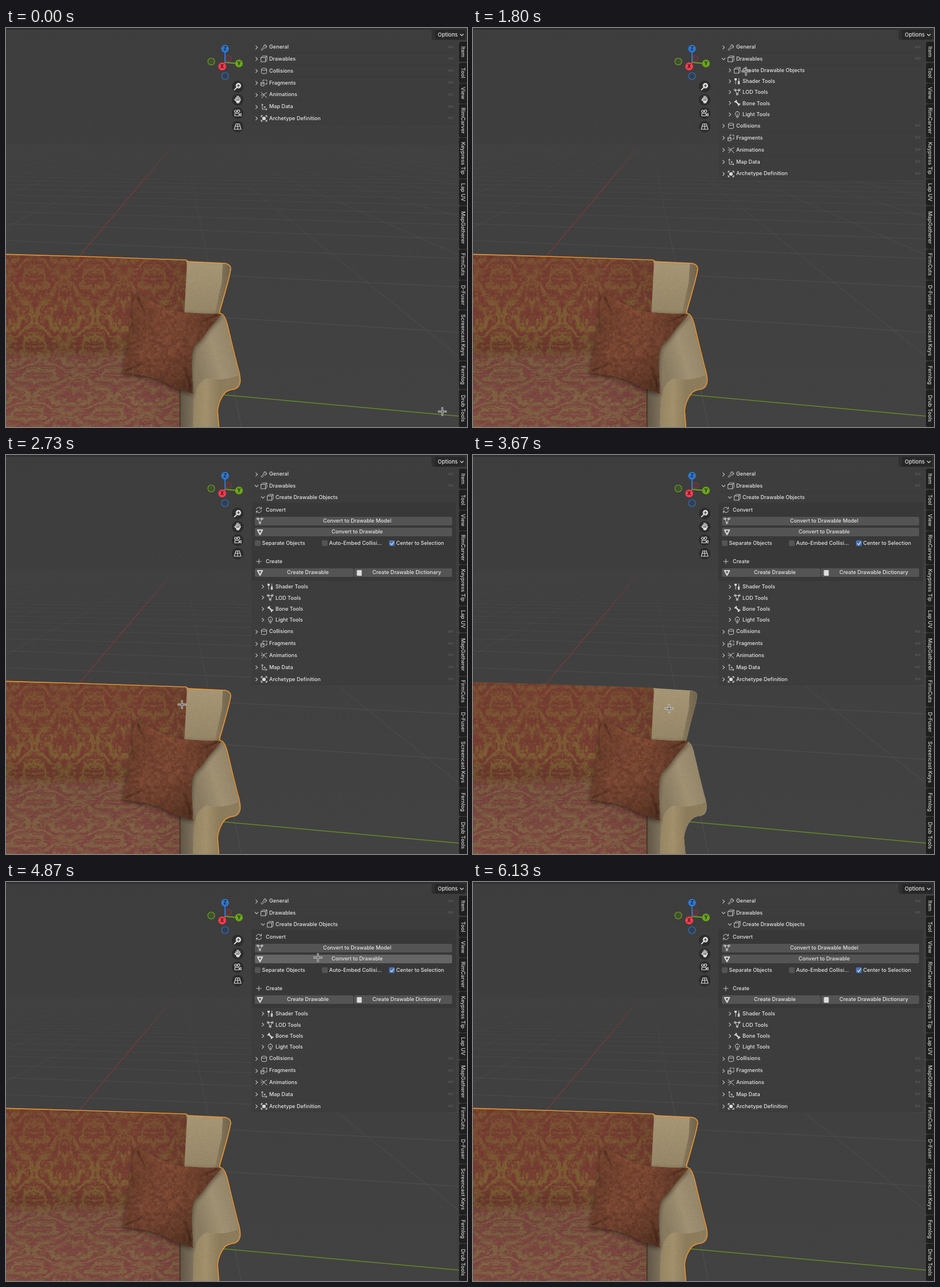
These frames come from a looping animation (804x697 px, 6.54 s). An HTML page with a canvas:

```html
<!DOCTYPE html>
<html lang="en">
<head>
<meta charset="utf-8">
<title>Viewport sidebar</title>
<style>
  html, body { margin: 0; width: 100%; height: 100%; overflow: hidden; background: #404040; }
  body { position: relative; font: 500 9.15px Inter, "Open Sans", sans-serif; color: #e4e4e4; white-space: nowrap; }
  canvas, .over { position: absolute; left: 0; top: 0; width: 804px; height: 697px; }
  .outline { fill: none; stroke: #f0962f; stroke-width: 1.6; stroke-linejoin: round; animation: select 6540ms step-end infinite; }

  .strip { position: absolute; left: 0; top: 0; width: 742px; height: 2.5px; background: #303030; }
  .options { position: absolute; left: 742px; top: 0; width: 62px; height: 21px; background: #303030; border-radius: 0 0 0 5px; }
  .options span { position: absolute; left: 6px; top: 3px; width: 53px; height: 17px; line-height: 17px; text-indent: 5px;
    background: #272727; border-radius: 3px; font-size: 9.4px; }
  .options svg { position: absolute; left: 48px; top: 7px; transform: rotate(90deg); }
  .tab { position: absolute; left: 790px; width: 14px; line-height: 14px; writing-mode: vertical-rl; text-align: center;
    background: #1f1f1f; border-radius: 3px 0 0 3px; color: #d2d2d2; }

  .panels { position: absolute; left: 428px; top: 23.1px; width: 357px; }
  .row { position: relative; height: 20.83px; line-height: 20.83px; background: #3d3d3d; }
  .main { box-shadow: inset 0 -1px #393939; }
  .row > *, .body > * { position: absolute; }
  .row b, .body b { font-weight: inherit; }
  .arrow { left: 4px; top: calc(50% - 5px); }
  .icon { left: 16px; top: calc(50% - 6px); }
  .row b { left: 31px; }
  .dots { left: 343px; top: calc(50% - 3px); width: 9px; height: 4px;
    background: radial-gradient(circle at 1px 1px, #5e5e5e .6px, transparent .9px) 0 0 / 2.4px 2.4px; }
  .sub { overflow: hidden; background: #3d3d3d; animation: sub 6540ms infinite; }
  .sub > div:first-child { margin-top: -.9px; }
  .sub .row { height: 19.3px; line-height: 19.3px; }
  .sub .row > * { margin-left: 11px; }
  .turn1 { animation: turn1 6540ms step-end infinite; }
  .turn2 { animation: turn2 6540ms step-end infinite; }

  .body { position: relative; height: 137.3px; overflow: hidden; background: #383838; animation: body 6540ms infinite; }
  .body b { line-height: 16px; }
  .btn { height: 14.6px; line-height: 14.6px; background: #545454; border-radius: 2.5px; text-align: center; box-sizing: border-box; padding-left: 13px; }
  .btn svg { position: absolute; left: 2.5px; top: 1.3px; }
  .model { animation: model 6540ms step-end infinite; }
  .convert { animation: convert 6540ms step-end infinite; }
  .box { width: 9.5px; height: 9.5px; background: #545454; border-radius: 2px; }
  .on { background: #4772b3; }
  .on svg { position: absolute; left: -.5px; top: -.5px; }
  .cursor { position: absolute; left: -8px; top: -8px; animation: move 6540ms linear infinite; }

  @keyframes select { 0%, 59.17% { opacity: 1 } 53.05% { opacity: 0 } }
  @keyframes sub {
    0%, 17.28% { height: 0; animation-timing-function: ease-out }
    19.42%, 28.29% { height: 96.3px; animation-timing-function: ease-out }
    30.58%, 100% { height: 233.6px }
  }
  @keyframes body {
    0%, 28.29% { height: 0; animation-timing-function: ease-out }
    30.58%, 100% { height: 137.3px }
  }
  @keyframes turn1 { 0% { transform: none } 17.28%, 100% { transform: rotate(90deg) } }
  @keyframes turn2 { 0% { transform: none } 28.29%, 100% { transform: rotate(90deg) } }
  @keyframes model { 0%, 33.7%, 100% { background: #545454 } 33% { background: #656565 } }
  @keyframes convert {
    0%, 34.4%, 79.6%, 100% { background: #545454 }
    33.8%, 65.9%, 74.46% { background: #656565 }
    71.4% { background: #4772b3 }
  }
  @keyframes move {
    0%, 1% { transform: translate(761px, 670px); animation-timing-function: cubic-bezier(.4, 0, .5, 1) }
    10.24% { transform: translate(475px, 93px) }
    12.23% { transform: translate(474px, 68px); animation-timing-function: ease-out }
    15.29%, 20.8% { transform: translate(475px, 56px); animation-timing-function: ease-in-out }
    26% { transform: translate(476px, 75px) }
    30.8% { transform: translate(476px, 77px); animation-timing-function: ease-in-out }
    40.83%, 46% { transform: translate(307px, 436px); animation-timing-function: ease-in-out }
    50.92%, 52% { transform: translate(453px, 430px); animation-timing-function: ease-in-out }
    56.12%, 59% { transform: translate(342px, 443px); animation-timing-function: ease-in-out }
    67.28%, 78.5% { transform: translate(544px, 132px); animation-timing-function: ease-in-out }
    88.69% { transform: translate(159px, 686px) }
    90.67% { transform: translate(125px, 675px) }
    92.66% { transform: translate(80px, 690px) }
    93.73%, 100% { transform: translate(77px, 712px) }
  }
</style>
</head>
<body>
<canvas width="804" height="697"></canvas>

<svg class="over" viewBox="0 0 804 697">
  <path class="outline" d="M-3 395.3L130 399L314 405.3L318 408L382 411Q392 413 392 421Q390 434 382 462Q376 484 373 493L372.5 498L378 500.5Q383 506 386 518L396 560L404 592Q409 608 408.5 618Q407 629 398 631Q388 632 382 637Q371 650 369 668L371.5 700"/>
  <g fill="none" stroke-width="1.2">
    <circle cx="388" cy="53" r="5" stroke="#7c3a40" fill="#54383b"/>
    <circle cx="358" cy="58.5" r="6" stroke="#6ca41a" fill="#42502f"/>
    <circle cx="382" cy="84" r="6" stroke="#3470b8" fill="#303f55"/>
    <path d="M382 60V42" stroke="#2f78d0" stroke-width="2"/>
    <path d="M382 60L401 61.7" stroke="#6ca41a" stroke-width="2"/>
    <path d="M382 60L377 67" stroke="#f33c50" stroke-width="2"/>
  </g>
  <g font-family="Inter, sans-serif" font-size="8.5" font-weight="700" text-anchor="middle">
    <circle cx="382" cy="36.3" r="6.7" fill="#2f78d0"/><text x="382" y="39.4" fill="#10233c">Z</text>
    <circle cx="406.3" cy="62" r="6.7" fill="#6ca41a"/><text x="406.3" y="65.1" fill="#1d2c07">Y</text>
    <circle cx="377" cy="67.2" r="6.9" fill="#f33c50"/><text x="377" y="70.3" fill="#4a0d15">X</text>
  </g>
  <g fill="#2c2c2c">
    <circle cx="404" cy="102.2" r="10.2"/><circle cx="404" cy="125.5" r="10.2"/>
    <circle cx="404" cy="148.8" r="10.2"/><circle cx="404" cy="172.2" r="10.2"/>
  </g>
  <g fill="none" stroke="#dedede" stroke-width="1.1" stroke-linecap="round" stroke-linejoin="round">
    <circle cx="405.3" cy="100.8" r="4.2" fill="#dedede"/><path d="M402 104.5L398.5 108" stroke-width="1.8"/>
    <path d="M403 100.8h4.6M405.3 98.5v4.6" stroke="#2c2c2c"/>
    <path d="M400.8 127v-5M403 125v-6M405.3 125v-6M407.6 126v-5M400.8 127l-2.3-2M402 129h5l2-4" stroke-width="1.6"/>
    <path d="M401.5 127h6l-1.5 4h-3z" fill="#dedede"/>
    <circle cx="400.5" cy="145.5" r="2"/><circle cx="405.5" cy="145.3" r="2.2"/>
    <path d="M399 149.5h7.5v4H399zM407 151l3-1.7v4.4l-3-1.7"/>
    <path d="M401 167.5h6l3 9.5h-12zM404 167.5v9.5M399.7 171.8h8.6"/>
  </g>
</svg>

<div class="strip"></div>
<div class="options"><span>Options</span><svg width="10" height="10" viewBox="0 0 10 10"><path d="M3.5 2l3 3-3 3" fill="none" stroke="#ddd" stroke-width="1.2"/></svg></div>
<div id="tabs"></div>
<div class="panels" id="panels"></div>

<svg class="cursor" width="16" height="16" viewBox="0 0 16 16" fill="none">
  <path d="M8 .5v15M.5 8h15" stroke="#ececec" stroke-width="2.8"/>
  <path d="M8 1.2v13.6M1.2 8h13.6" stroke="#222" stroke-width="1"/>
</svg>

<script>
// ---------- interface ----------
const icons = {
  wrench: ["M1.2 9.3L5.3 5.2A2.9 2.9 0 0 1 9 1.4L7.4 3.2l1.4 1.4 1.8-1.6a2.9 2.9 0 0 1-3.8 3.7L2.7 10.8z"],
  cube: ["M1 3.5h7.5V11H1zM1 3.5L3.5 1H11v7.5L8.5 11M8.5 3.5L11 1"],
  cylinder: ["M1.5 3a4.5 1.8 0 0 1 9 0v6a4.5 1.8 0 0 1-9 0zM1.5 3a4.5 1.8 0 0 0 9 0"],
  pieces: ["M1 5h5v6H1zM1 8l5-2M4 3V1h3M9 1h2v2M11 5v3H8"],
  run: ["M1 1.5l4 3.5 6-3M5 5l2 2 4 4M6 6l-4 5M1 6h3"],
  axes: ["M3 1v9h8M9.3 8.3L11 10l-1.7 1.7M1.4 2.8L3 1l1.6 1.8M6.5 5.5h1.5V7H6.5z"],
  frame: ["M1 3.5V1h2.5M8.5 1H11v2.5M11 8.5V11H8.5M3.5 11H1V8.5M3.7 3.7h4.6v4.6H3.7z", "#ddd"],
  tools: ["M1.5 1v3h3V1M3 4v7M8.7 1v5M7.7 6h2v5h-2z", "#ddd"],
  mesh: ["M2.5 2.5h7L6 9.5zM1 1h2.5v2.5H1zM8.5 1H11v2.5H8.5zM4.8 8.5h2.4V11H4.8z"],
  bone: ["M3.7 3.7l4.6 4.6M2 4h.1M4 2h.1M8 10h.1M10 8h.1", "none", 2.5],
  bulb: ["M6 1a3.8 3.8 0 0 1 2 7v1.5H4V8a3.8 3.8 0 0 1 2-7zM4.7 11.3h2.6M6 5v3"],
  cycle: ["M1.5 5A4.6 4.6 0 0 1 10 3.5M10.5 1v3h-3M10.5 7A4.6 4.6 0 0 1 2 8.5M1.5 11V8h3"],
  plus: ["M6 2v8M2 6h8"],
  solid: ["M1.8 2h8.4L6 10z", "none", 2.2],
  book: ["M3 1.5h7v9H3zM1.5 3.5H3M1.5 6H3M1.5 8.5H3", "#ddd"],
  tick: ["M2.5 5.5L4.7 8 8.2 2.8", "none", 1.4]
};
const icon = (name, style = "") => {
  const [d, fill = "none", width = 0.9] = icons[name];
  return `<svg class="icon" style="${style}" width="12" height="12" viewBox="0 0 12 12"><path d="${d}" fill="${fill}" stroke="#d6d6d6" stroke-width="${width}" stroke-linecap="round" stroke-linejoin="round"/></svg>`;
};
const arrow = turn => `<svg class="arrow ${turn}" width="10" height="10" viewBox="0 0 10 10"><path d="M3.4 1.8L6.6 5 3.4 8.2" fill="none" stroke="#c4c4c4" stroke-width="1.1"/></svg>`;
const row = (name, pic, turn = "") => `<div class="row">${arrow(turn)}${icon(pic)}<b>${name}</b></div>`;
const main = (...args) => row(...args).replace('"row"', '"row main"').replace(/<\/div>$/, '<i class="dots"></i></div>');
const label = (name, x, y) => `<b style="left:${x}px;top:${y - 8}px">${name}</b>`;
const button = (name, pic, x, y, w, kind = "") =>
  `<div class="btn ${kind}" style="left:${x}px;top:${y - 7.3}px;width:${w}px">${icon(pic)}${name}</div>`;
const check = (name, x, on) =>
  `<i class="box ${on ? "on" : ""}" style="left:${x}px;top:66.2px">${on ? icon("tick") : ""}</i>` + label(name, x + 12.5, 71);
const head = (name, pic, y) => icon(pic, `left:7px;top:${y - 6}px`) + label(name, 25, y);

const body = `<div class="body">
  ${head("Convert", "cycle", 13)}
  ${button("Convert to Drawable Model", "mesh", 6, 32.3, 344, "model")}
  ${button("Convert to Drawable", "solid", 6, 51.5, 344, "convert")}
  ${check("Separate Objects", 6)}${check("Auto-Embed Collisi...", 123)}${check("Center to Selection", 240, true)}
  ${head("Create", "plus", 103)}
  ${button("Create Drawable", "solid", 6, 122.5, 172)}${button("Create Drawable Dictionary", "book", 179, 122.5, 171)}
</div>`;

document.getElementById("panels").innerHTML =
  main("General", "wrench") + main("Drawables", "cube", "turn1") +
  `<div class="sub">${row("Create Drawable Objects", "cube", "turn2")}${body}${row("Shader Tools", "tools")}${row("LOD Tools", "mesh")}${row("Bone Tools", "bone")}${row("Light Tools", "bulb")}</div>` +
  main("Collisions", "cylinder") + main("Fragments", "pieces") + main("Animations", "run") +
  main("Map Data", "axes") + main("Archetype Definition", "frame");

const tabs = [["Item", 24], ["Tool", 60.5], ["View", 97], ["RimCarver", 133], ["Keypress Tip", 192], ["Lap UV", 264],
  ["MapGatherer", 311], ["FirmCuts", 387], ["D-Fuser", 441], ["Screencast Keys", 493], ["Fernlog", 582], ["Drub Tools", 632]];
document.getElementById("tabs").innerHTML = tabs.map(([name, y], i) =>
  `<div class="tab" style="top:${y}px;height:${(tabs[i + 1] || [0, 698])[1] - y - 1.5}px">${name}</div>`).join("");

// ---------- viewport ----------
const ctx = document.querySelector("canvas").getContext("2d");
const gradient = (x0, y0, x1, y1, ...stops) => {
  const g = ctx.createLinearGradient(x0, y0, x1, y1);
  stops.forEach((c, i) => g.addColorStop(i / (stops.length - 1), c));
  return g;
};
const line = (x0, y0, x1, y1, style, width = 1) => {
  ctx.strokeStyle = style;
  ctx.lineWidth = width;
  ctx.beginPath();
  ctx.moveTo(x0, y0);
  ctx.lineTo(x1, y1);
  ctx.stroke();
};

ctx.fillStyle = gradient(0, 0, 0, 697, "#3d3d3d", "#404040", "#424242");
ctx.fillRect(0, 0, 804, 697);

// Floor grid: one family meets at (308,185), the other far to the left on the same horizon.
const horizon = 185;
const faded = gradient(0, 195, 0, 480, "rgba(84,84,84,0)", "rgba(84,84,84,.5)", "rgba(84,84,84,.75)");
for (let k = -14; k <= 14; k++) {
  const slope = 0.2 + 1.04 * k;
  if (k !== -1) line(308, horizon, 308 + slope * 520, 705, faded);
}
for (let n = 1; n < 60; n++) {
  const depth = 1 / (0.002185 + 0.00092 * n);
  const at = x => horizon + depth * (x + 4700) / 5100;
  line(0, at(0), 804, at(804), faded);
}
line(290, 206, 121, 407, gradient(0, 200, 0, 270, "rgba(126,56,56,.1)", "rgba(126,56,56,.95)"), 1.2);
line(370, 640, 790, 678, "#628a26", 1.3);

// ---------- sofa ----------
const hash = (x, y) => {
  const s = Math.sin(x * 127.1 + y * 311.7) * 43758.5453;
  return s - Math.floor(s);
};
const mix = (a, b, t) => a + (b - a) * t;
const smooth = (a, b, x) => {
  const t = Math.min(1, Math.max(0, (x - a) / (b - a)));
  return t * t * (3 - 2 * t);
};
const noise = (x, y) => {
  const i = Math.floor(x), j = Math.floor(y), u = smooth(0, 1, x - i), v = smooth(0, 1, y - j);
  return mix(mix(hash(i, j), hash(i + 1, j), u), mix(hash(i, j + 1), hash(i + 1, j + 1), u), v);
};
const blend = (a, b, t) => a.map((c, i) => mix(c, b[i], t));

// Damask: ogee outlines with curls that mirror about every column.
const damask = (u, v) => {
  const mu = Math.abs(u - Math.round(u)), mv = v - Math.floor(v);
  const curl = noise(mu * 11, mv * 11), fine = noise(mu * 34, mv * 34);
  const ogee = Math.cos(6.283 * u) + Math.cos(6.283 * v);
  const rings = Math.sin(ogee * 5 + curl * 4);
  const leaves = Math.sin(curl * 16 + ogee * 3);
  return smooth(-0.9, 1.1, rings * 0.6 + leaves * 0.55 + (fine - 0.5) * 1.2);
};
const cloth = (x, y) => {
  const seat = smooth(560, 582, y + 4 * noise(x / 9, 3));
  const warp = 0.05 * noise(x / 30, y / 30);
  const gold = mix(0.6, 0.95, smooth(400, 540, y));
  const back = blend([119, 61, 50], [128, 98, 53], damask(x / 104 + warp, (y - 30) / 118) * gold);
  const flat = blend([120, 67, 62], [124, 101, 66], damask((x + (y - 570) * 0.3) / 140 + warp, (y - 575) / 68) * 0.85);
  const light = 0.97 + 0.2 * (hash(x, y) - 0.5) + 0.06 * smooth(570, 690, y) - 0.1 * smooth(520, 562, y) * (1 - seat);
  return blend(back, flat, seat).map(c => c * light);
};
const rust = (x, y) => {
  const t = noise(x / 5, y / 5) * 0.6 + noise(x / 2, y / 2) * 0.4;
  return blend([97, 54, 40], [139, 83, 58], t).map(c => c + 14 * (hash(x, y) - 0.5));
};
const linen = (x, y) => {
  const rib = 2.5 * Math.sin(y * 1.9 + x * 0.12) + 10 * (hash(x, y) - 0.5);
  return [165 + rib, 149 + rib, 116 + rib];
};

const W = 412, H = 304, TOP = 393;
const texture = colour => {
  const c = document.createElement("canvas");
  c.width = W;
  c.height = H;
  const g = c.getContext("2d"), img = g.createImageData(W, H);
  for (let y = 0, p = 0; y < H; y++)
    for (let x = 0; x < W; x++, p += 4) img.data.set([...colour(x, y + TOP), 255], p);
  g.putImageData(img, 0, 0);
  return c;
};
const paint = (d, tex, ...shades) => {
  const path = new Path2D(d);
  ctx.save();
  ctx.clip(path);
  ctx.drawImage(tex, 0, TOP);
  for (const s of shades) {
    ctx.fillStyle = s;
    ctx.fill(path);
  }
  ctx.restore();
};
const clear = "rgba(30,20,10,0)", dark = a => `rgba(30,20,10,${a})`;
const fabric = texture(cloth), beige = texture(linen), velvet = texture(rust);

// back wing: front face, then its turned side
paint("M312 407L382 411.5Q392 414 391 421Q389 435 381 462L372 499L345 505L309 500Z", beige,
  gradient(0, 410, 0, 500, clear, dark(0.12)));
paint("M378 411.3L382 411.5Q392 414 391 421Q389 435 381 462L372 499L364 499L376 445Z", beige,
  gradient(366, 0, 391, 0, dark(0.22), dark(0.38)));

// back and seat
paint("M0 396.5L130 400L313 406.5Q316 408 315.5 414L311 500L330 640L303 697H0Z", fabric,
  gradient(0, 396, 0, 404, "rgba(150,75,60,.35)", clear), gradient(230, 0, 315, 0, clear, dark(0.1)));

// shaded inner side between seat and arm
paint("M303 628L328 632L326 697H303Z", beige, "rgba(75,68,62,.45)", gradient(303, 0, 326, 0, dark(0.3), clear));
line(303.5, 628, 303.5, 697, "rgba(35,22,18,.6)", 1.5);

// arm
paint("M374 500Q381 502 385 517L395 560L403 592Q408.5 609 407.5 618Q406 629 397 630.5Q387 631 381 637Q370 650 368 668L370.5 697H326L327 640L324 590L325 560L350 525Z", beige,
  gradient(330, 580, 402, 560, dark(0.2), clear, dark(0.12)), "rgba(120,115,105,.12)");
paint("M326 697L329 646Q333 616 352 612Q378 618 406 606Q409 626 397 630.5Q387 631 381 637Q370 650 368 668L370.5 697Z", beige,
  gradient(326, 0, 372, 0, dark(0.1), clear, dark(0.18)), "rgba(140,115,60,.14)");

// pillow
const pillow = "M227 460Q240 470 262 481Q285 494 312 497Q345 500 377 499Q362 515 349 532Q340 546 330 553Q324 564 324 580Q321 610 326 639Q310 632 293 627Q268 612 240 607Q220 605 203 601Q210 580 214 545Q222 505 221 482Z";
ctx.save();
ctx.shadowColor = "rgba(20,10,5,.6)";
ctx.shadowBlur = 8;
ctx.shadowOffsetY = 3;
ctx.fillStyle = "#6b3f2c";
ctx.fill(new Path2D(pillow));
ctx.restore();
paint(pillow, velvet,
  gradient(208, 520, 340, 560, dark(0.22), clear, clear, dark(0.2)),
  gradient(270, 480, 290, 640, "rgba(170,95,60,.14)", clear, dark(0.28)));
for (const [x0, y0, x1, y1] of [[230, 470, 252, 520], [370, 501, 318, 522], [322, 628, 308, 580], [208, 599, 250, 580]])
  line(x0, y0, x1, y1, gradient(x0, y0, x1, y1, dark(0.35), clear), 4);
</script>
</body>
</html>
```
